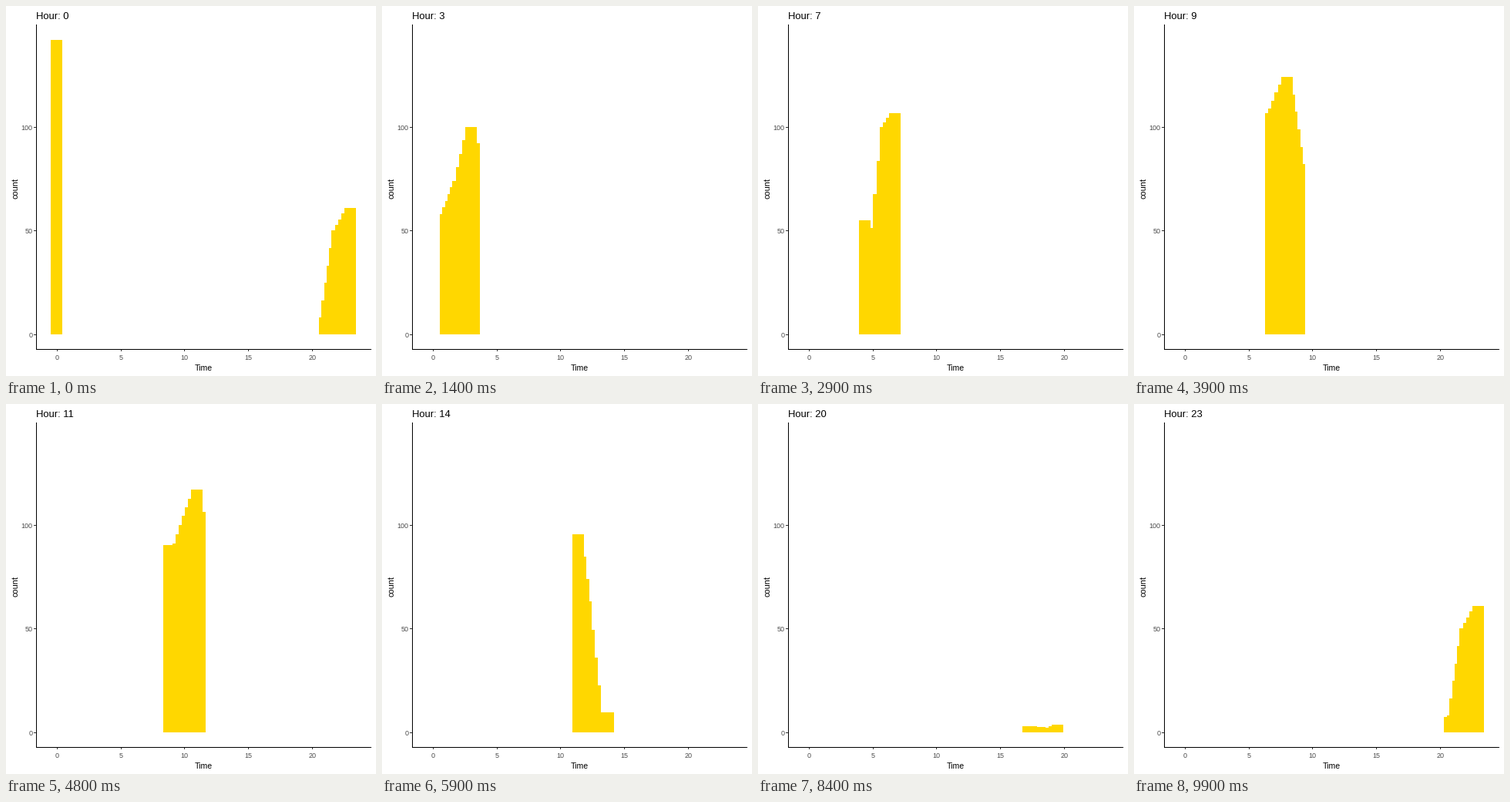
Write a matplotlib script that moves like this. It is 480 by 480 pixels and loops after 10000 ms.

```python
import math

import matplotlib.pyplot as plt
import numpy as np
from matplotlib.animation import FuncAnimation
from matplotlib.patches import Rectangle

SIZE, DPI = 480, 80
FRAMES, WAKE = 100, 10
X0, X_UNIT = 66.3, 16.55
Y0, Y_UNIT = 426.35, 2.69
HALF_BAR = 0.45
GOLD, BLACK, TICK, LABEL = "#FFD700", "#000000", "#333333", "#4D4D4D"

plt.rcParams["font.family"] = "Liberation Sans"

# No observations at hour 18
hours = np.array([h for h in range(24) if h != 18])
counts = np.array([142, 58, 74, 100, 68, 35, 100, 109, 124, 82, 100, 117,
                   63, 9, 10, 8, 5, 3, 2, 5, 8, 50, 61])

# Each hour lands on a whole frame; position and height are tweened between
keys = np.round(hours * (FRAMES - 1) / 23)
steps = np.arange(FRAMES)
bar_x = np.interp(steps, keys, hours)
bar_h = np.interp(steps, keys, counts)

fig = plt.figure(figsize=(SIZE / DPI, SIZE / DPI), dpi=DPI, facecolor="white")
ax = fig.add_axes([0, 0, 1, 1])
ax.set_xlim(0, SIZE)
ax.set_ylim(SIZE, 0)
ax.axis("off")


def px(x):
    return math.floor(X0 + x * X_UNIT)


def py(y):
    return math.floor(Y0 - y * Y_UNIT)


def box(x, y, w, h, color):
    return ax.add_patch(Rectangle((x, y), w, h, fc=color, lw=0,
                                  antialiased=False))


def label(x, y, text, size, color=BLACK, ha="center", **kw):
    return ax.text(x, y, text, fontsize=size * 72 / DPI, color=color,
                   ha=ha, va="baseline", **kw)


bars = [box(0, 0, 0, 0, GOLD) for _ in range(WAKE + 1)]

for v in range(0, 25, 5):
    if v <= 20:
        box(px(v), 446, 1, 2, TICK)
        label(px(v) + 0.2, 459, str(v), 9, LABEL)
for v in (0, 50, 100):
    box(36, py(v), 3, 1, TICK)
    label(34.3, py(v) + 4, str(v), 9, LABEL, ha="right")
box(39, 24, 1, 422, BLACK)
box(39, 445, 435, 1, BLACK)

label(256.3, 473, "Time", 10.5)
label(15, 236, "count", 11, rotation=90, rotation_mode="anchor")
title = label(38.7, 17, "", 13, ha="left")


def update(i):
    for bar, back in zip(bars, range(WAKE, -1, -1)):
        k = (i - back) % FRAMES
        left, right = px(bar_x[k] - HALF_BAR), px(bar_x[k] + HALF_BAR)
        top, base = py(bar_h[k]), py(0)
        bar.set_bounds(left, top, right - left, base - top)
    title.set_text(f"Hour: {round(i * 23 / (FRAMES - 1))}")
    return [*bars, title]


anim = FuncAnimation(fig, update, frames=FRAMES, interval=100, repeat=True,
                     repeat_delay=0, blit=False)
plt.show()
```
